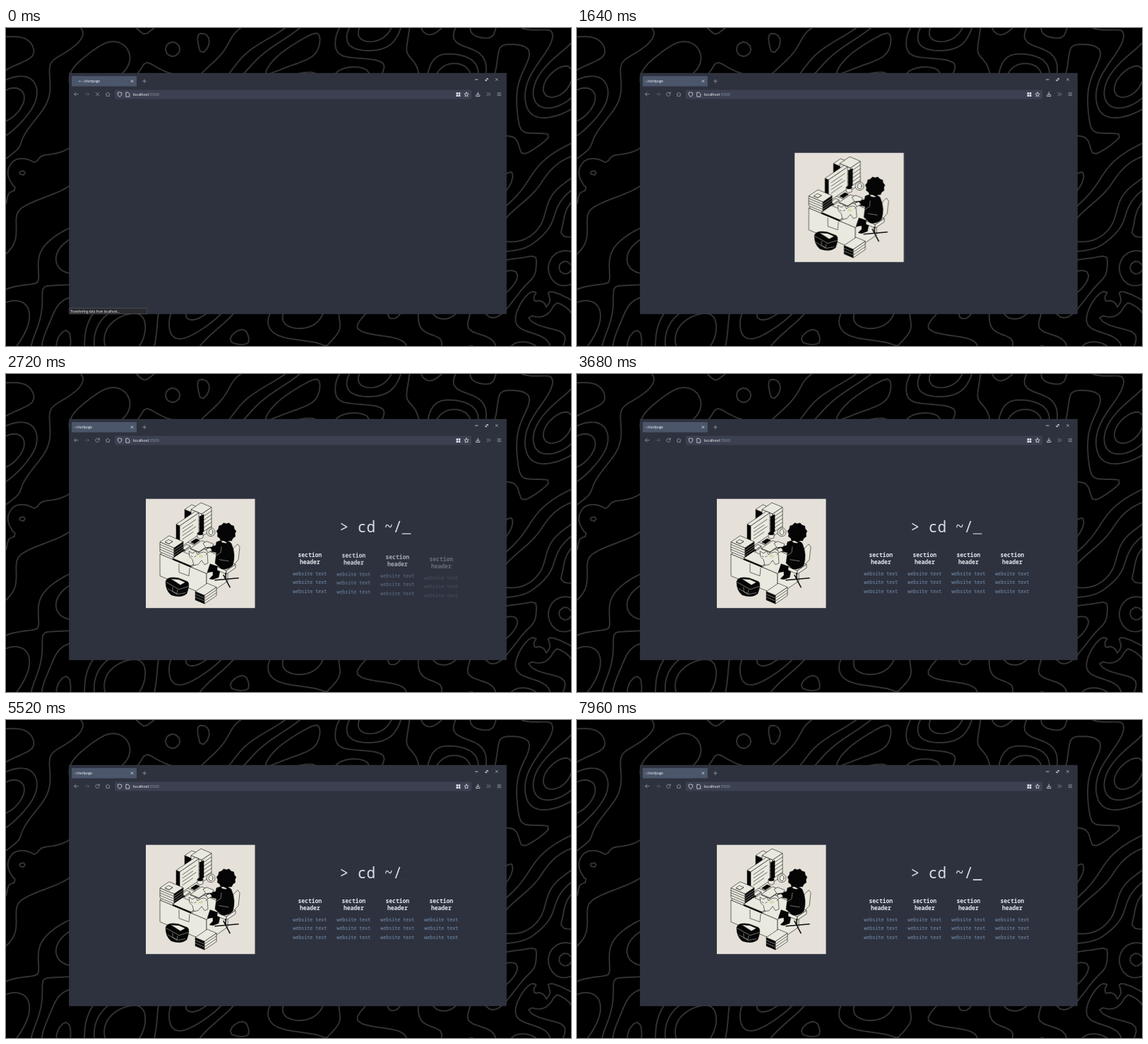
These frames come from a looping animation (800x450 px, 8000 ms). An HTML page:

```html
<!DOCTYPE html>
<html lang="en">
<head>
<meta charset="utf-8">
<title>~/startpage</title>
<style>
  html, body { margin: 0; width: 100%; height: 100%; overflow: hidden; background: #000; }
  svg { display: block; width: 100vw; height: 100vh; }
  .ui { font-family: Lato, sans-serif; fill: #eceff4; }
  .mono { font-family: "Noto Sans Mono", "DejaVu Sans Mono", monospace; text-anchor: middle; }
  .icon { fill: none; stroke: #969cab; stroke-width: .8; stroke-linecap: round; stroke-linejoin: round; }
  .bright { stroke: #dfe3ea; }
  .ink { fill: #050505; stroke: #050505; stroke-width: .5; stroke-linejoin: round; }
  .paper { fill: #eae9df; stroke: #111; stroke-width: .6; stroke-linejoin: round; }
  .line { fill: none; stroke: #111; stroke-width: .6; stroke-linecap: round; stroke-linejoin: round; }
  .light { fill: none; stroke: #dddcd2; stroke-width: .5; stroke-linecap: round; }
  #art { animation: art 8s infinite; }
  #cursor { animation: blink 1s infinite; }
  .busy { animation: busy 8s step-end infinite; }
  .ready { animation: ready 8s step-end infinite; }
  #dot { animation: dot .5s ease-in-out infinite alternate; }
  .code line { stroke-dasharray: 2.4 .8 1.6 .7; animation: code .8s steps(4) infinite; }
  @keyframes art {
    0%, 8.6% { opacity: 0; transform: translate(123.5px, 40px); animation-timing-function: ease-in-out; }
    18.2% { opacity: 1; transform: translate(123.5px, 0); animation-timing-function: ease-in-out; }
    28.3%, 100% { opacity: 1; transform: none; }
  }
  @keyframes blink { 50% { opacity: 0; } }
  @keyframes busy { 0% { opacity: 1; } 3.5%, 100% { opacity: 0; } }
  @keyframes ready { 0% { opacity: 0; } 3.5%, 100% { opacity: 1; } }
  @keyframes dot { to { transform: translateX(-5px); } }
  @keyframes code { to { stroke-dashoffset: -5.5; } }
</style>
</head>
<body>
<svg viewBox="0 0 800 450" preserveAspectRatio="none">
  <rect width="800" height="450"/>
  <path id="contours" fill="none" stroke="#333" stroke-width="1.9" stroke-linecap="round"/>

  <g id="window">
    <rect x="89.5" y="64" width="619" height="340.5" fill="#2e323e" stroke="#3a3e49" stroke-width=".5"/>
    <rect x="93" y="68" width="92" height="14.5" rx="1" fill="#4b566a"/>
    <rect x="154" y="87.5" width="505" height="13" rx="1.5" fill="#3b4151"/>
    <g class="ui" font-size="5.1">
      <g class="busy">
        <ellipse id="dot" cx="104.3" cy="75.4" rx="2" ry=".8" fill="#7fa3c8"/>
        <text x="107" y="77.2">~/startpage</text>
        <rect x="89.8" y="396.6" width="109.7" height="8" fill="#2a2b2e" stroke="#5a5b5e" stroke-width=".6"/>
        <text x="91.3" y="402.5" font-size="4.75">Transferring data from localhost...</text>
      </g>
      <text class="ready" x="96" y="77.2">~/startpage</text>
      <text x="180" y="96" font-size="5.65">localhost<tspan fill="#8b91a0">:5500</tspan></text>
    </g>
    <g class="icon">
      <path class="bright" d="M177 73.7l3 3m0-3l-3 3"/>
      <path d="M193.6 75.2h4.8m-2.4-2.4v4.8"/>
      <path id="back" d="M102.3 93.7h-5.6m2.4-2.4l-2.4 2.4 2.4 2.4"/>
      <use href="#back" transform="matrix(-1 0 0 1 214.3 0)" opacity=".4"/>
      <path class="busy" d="M127.3 91.4l4.6 4.6m0-4.6l-4.6 4.6"/>
      <path class="ready" d="M131.7 92.2a2.7 2.7 0 1 0 .4 2.3M132.3 90.8v2h-2"/>
      <path d="M141.3 93.6l2.8-2.6 2.8 2.6M142 93.2v3.2h4.2v-3.2"/>
      <path class="bright" d="M161 90.9l2.8 1c0 2.8-.8 4.5-2.8 5.4-2-.9-2.8-2.6-2.8-5.4z"/>
      <path class="bright" d="M170.2 91.2h2.8l1.8 1.8v4.2h-4.6z"/>
      <path class="bright" id="star"/>
      <path class="bright" d="M668.2 90.8v4m-1.8-1.6l1.8 1.8 1.8-1.8M665.6 95v1.6h5.2V95"/>
      <path d="M681 91.6l2.1 2.1-2.1 2.1m2.8-4.2l2.1 2.1-2.1 2.1M696 91.8h4.6m-4.6 1.9h4.6m-4.6 1.9h4.6"/>
      <path class="bright" d="M664.4 73h3.6M679 74.6l3.2-3.2m-1.7 0h1.7v1.7m-3.2-.1v1.6h1.6"/>
      <path stroke="#b9b3aa" d="M693.3 71.4l3 3m0-3l-3 3"/>
    </g>
    <path d="M637.5 92.5h5.8m-5.8 3.2h5.8" stroke="#eceff4" stroke-width="2.6" stroke-dasharray="2.6 .6"/>
  </g>

  <g id="art"><g id="scene" transform="translate(198 176.7)"></g></g>

  <g id="prompt" class="mono" font-size="21" fill="#d8dee9">
    <text x="523" y="223.6" xml:space="preserve">&gt; cd ~/<tspan fill="none">_</tspan></text>
    <text id="cursor" x="567.1" y="223.6">_</text>
  </g>
  <g id="columns" class="mono"/>
</svg>
<script>
const byId = id => document.getElementById(id);
const range = n => [...Array(n).keys()];
const ring = (cx, cy, n, radius) => 'M' + range(n).map(i => {
  const a = (i / n - .25) * 2 * Math.PI;
  return [cx + radius(i) * Math.cos(a), cy + radius(i) * Math.sin(a)].map(v => v.toFixed(2));
}).join('L') + 'z';
byId('star').setAttribute('d', ring(652, 94.2, 10, i => i % 2 ? 1.5 : 3.3));

// ---- Topographic lines: level curves of random waves with a few placed hills ----
let seed = 21;
const random = () => (seed = seed * 16807 % 2147483647) / 2147483647;
const waves = range(12).map(() => {
  const angle = random() * Math.PI * 2, k = 2 * Math.PI / (95 + 130 * random());
  return { x: k * Math.cos(angle), y: k * Math.sin(angle), phase: random() * 6.3 };
});
const hills = [
  { x: 236, y: 30, r: 10, reach: 34 },
  { x: 757, y: 391, r: 9, reach: 17 },
  { x: 23, y: 205, r: 19, reach: 28 },
  { x: 792, y: 339, r: 24, reach: 48 }
];
const GAP = 2.5, STEP = 5;

function height(x, y) {
  let h = waves.reduce((sum, w) => sum + Math.cos(w.x * x + w.y * y + w.phase), 0);
  for (const hill of hills) {
    const d = Math.hypot(x - hill.x, y - hill.y);
    const weight = Math.exp(-((d / hill.reach) ** 4));
    h += weight * (GAP * (hill.r - d) / 15 - h);
  }
  return h;
}

function contourPath() {
  let d = '';
  for (let y = 0; y < 450; y += STEP) for (let x = 0; x < 800; x += STEP) {
    if (x >= 95 && x < 700 && y >= 70 && y < 395) continue;
    const corners = [[x, y], [x + STEP, y], [x + STEP, y + STEP], [x, y + STEP]];
    const h = corners.map(c => height(...c));
    for (let level = Math.ceil(Math.min(...h) / GAP) * GAP; level < Math.max(...h); level += GAP) {
      const hits = [];
      corners.forEach((a, i) => {
        const j = (i + 1) % 4, b = corners[j];
        if (h[i] < level === h[j] < level) return;
        const t = (level - h[i]) / (h[j] - h[i]);
        hits.push(a.map((v, k) => (v + t * (b[k] - v)).toFixed(1)));
      });
      hits.forEach((p, i) => d += (i % 2 ? 'L' : 'M') + p);
    }
  }
  return d;
}
byId('contours').setAttribute('d', contourPath());

// ---- Illustration: isometric boxes plus a few free shapes ----
const shape = (style, d) => `<path class="${style}" d="${d}"/>`;
const oval = (style, x, y, rx, ry) => `<ellipse class="${style}" cx="${x}" cy="${y}" rx="${rx}" ry="${ry}"/>`;
// Point a steps right-down, b steps right-up and h steps down from a corner.
const iso = (x, y, a, b, h = 0) => [x + a + b, y + .42 * a - .68 * b + h];

function box(x, y, a, b, h, { left = 'paper', right = 'paper', top = 'paper', pages = 0 } = {}) {
  const p = (i, j, k = 0) => iso(x, y, i, j, k);
  const face = (style, ...pts) => shape(style, 'M' + pts.join('L') + 'z');
  const edges = range(pages).map(i => {
    const k = h * (i + 1) / (pages + 1);
    return shape(left === 'ink' ? 'light' : 'line', `M${p(0, 0, k)}L${p(a, 0, k)}`) +
      shape(right === 'ink' ? 'light' : 'line', `M${p(a, 0, k)}L${p(a, b, k)}`);
  }).join('');
  return face(left, p(0, 0), p(a, 0), p(a, 0, h), p(0, 0, h)) +
    face(right, p(a, 0), p(a, b), p(a, b, h), p(a, 0, h)) +
    face(top, p(0, 0), p(a, 0), p(a, b), p(0, b)) + edges;
}

const screenText = '<g class="code">' + range(4).map(i => {
  const [x1, y1] = iso(52, 42 + 5 * i, 0, 0), [x2, y2] = iso(52, 42 + 5 * i, 0, 19 - i % 2 * 4);
  return `<line class="line" x1="${x1}" y1="${y1}" x2="${x2}" y2="${y2}"/>`;
}).join('') + '</g>';

byId('scene').innerHTML = [
  '<rect width="154.5" height="154.5" fill="#e5e1d9"/>',
  box(20, 78, 66, 30, 31),
  shape('line', 'M47 92v12l14 5 1-11'),
  box(55, 15, 12, 10, 14, { left: 'ink' }),
  box(64, 15, 15, 14, 32, { pages: 5 }),
  shape('ink', 'M76 25l6-3v24l-6 4z'),
  oval('paper', 92, 47, 6, 6), oval('line', 92, 47, 3, 4),
  box(50, 70, 5, 8, 2, { left: 'ink' }),
  box(43, 36, 5, 27, 31, { left: 'ink' }),
  screenText,
  shape('paper', 'M73 49v6q4 3 8 0v-6z'), oval('ink', 77, 49, 4, 2),
  box(64, 61, 5, 7, 1, { top: 'ink' }),
  box(63, 70, 12, 16, 1),
  box(20, 61, 20, 13, 14, { right: 'ink', pages: 3 }),
  box(27, 61, 6, 5, 0),
  box(38, 84, 26, 14, 2, { left: 'ink' }),
  // cat
  shape('paper', 'M62 82l-1-8 5 3 5-3 2 5q10-7 14-1l1 13-5 2-4-6-5 6-6 1-2-8z'),
  shape('line', 'M64 81l2 1m3 0l2-1M85 79q7-5 3-12'),
  oval('', 78, 81, 3.5, 2).replace('class=""', 'fill="#ddd9ae"'),
  // chair and person
  shape('ink', 'M91 92l15 5-3 14-8 3-5-1 5-5v-5l-8 1z'),
  shape('paper', 'M124 70l6-6 3 4-2 18-9 10-4-3z'),
  box(101, 96, 13, 13, 5),
  shape('line', 'M113 105v9M98 115l33-3M110 108l9 17').replace('/>', ' style="stroke-width:1.6"/>'),
  shape('ink', 'M100 61Q113 55 121 63Q128 79 123 94Q116 101 107 99L98 91 100 76 86 73 87 68 99 66z'),
  shape('paper', 'M81 63l5-3 10 4-2 4-9 1zM85 71l6-2 3 4-6 3z'),
  shape('light', 'M107 68l-1 8-6 4M104 86l13 2'),
  shape('paper', 'M105 57l11 2-2 4-6-1z'),
  shape('ink', ring(114, 47.5, 22, i => 12.3 + i % 2 * 1.6)),
  // bag
  shape('ink', 'M28 117Q30 109 46 112L59 117Q63 120 58 134 50 141 36 136 28 130 28 117z'),
  shape('paper', 'M35 113l12 1 9 4-7 4z'),
  shape('light', 'M29 118l18 10 13-4M31 127l13 8 12-2M38 125v6l6 3 1-5'),
  box(70, 131, 13, 17, 12, { left: 'ink', pages: 2 })
].join('');

// ---- Page text ----
const label = (x, y, text, style) => `<text x="${x}" y="${y}" ${style}>${text}</text>`;
const head = 'font-size="8" font-weight="700" fill="#e5e9f0"';
const link = 'font-size="6.7" fill="#7690b2"';
byId('columns').innerHTML = range(4).map(i => {
  const x = 430.3 + 62 * i;
  const links = range(3).map(row => label(x, 284.6 + 12.6 * row, 'website text', link)).join('');
  return `<g id="col${i}">${label(x, 258.8, 'section', head)}${label(x, 268.6, 'header', head)}${links}</g>`;
}).join('');

// Fade in while rising, from the given percentage of the loop.
const sheet = document.head.appendChild(document.createElement('style'));
function rise(id, start, shift) {
  sheet.textContent += `
    #${id} { animation: ${id} 8s infinite; }
    @keyframes ${id} {
      0%, ${start}% { opacity: 0; transform: translateY(${shift}px); animation-timing-function: ease-in-out; }
      ${start + 10}%, 100% { opacity: 1; transform: none; }
    }`;
}
rise('prompt', 22.5, 7);
for (const i of range(4)) rise('col' + i, 24 + 2 * i, 9);
</script>
</body>
</html>
```
